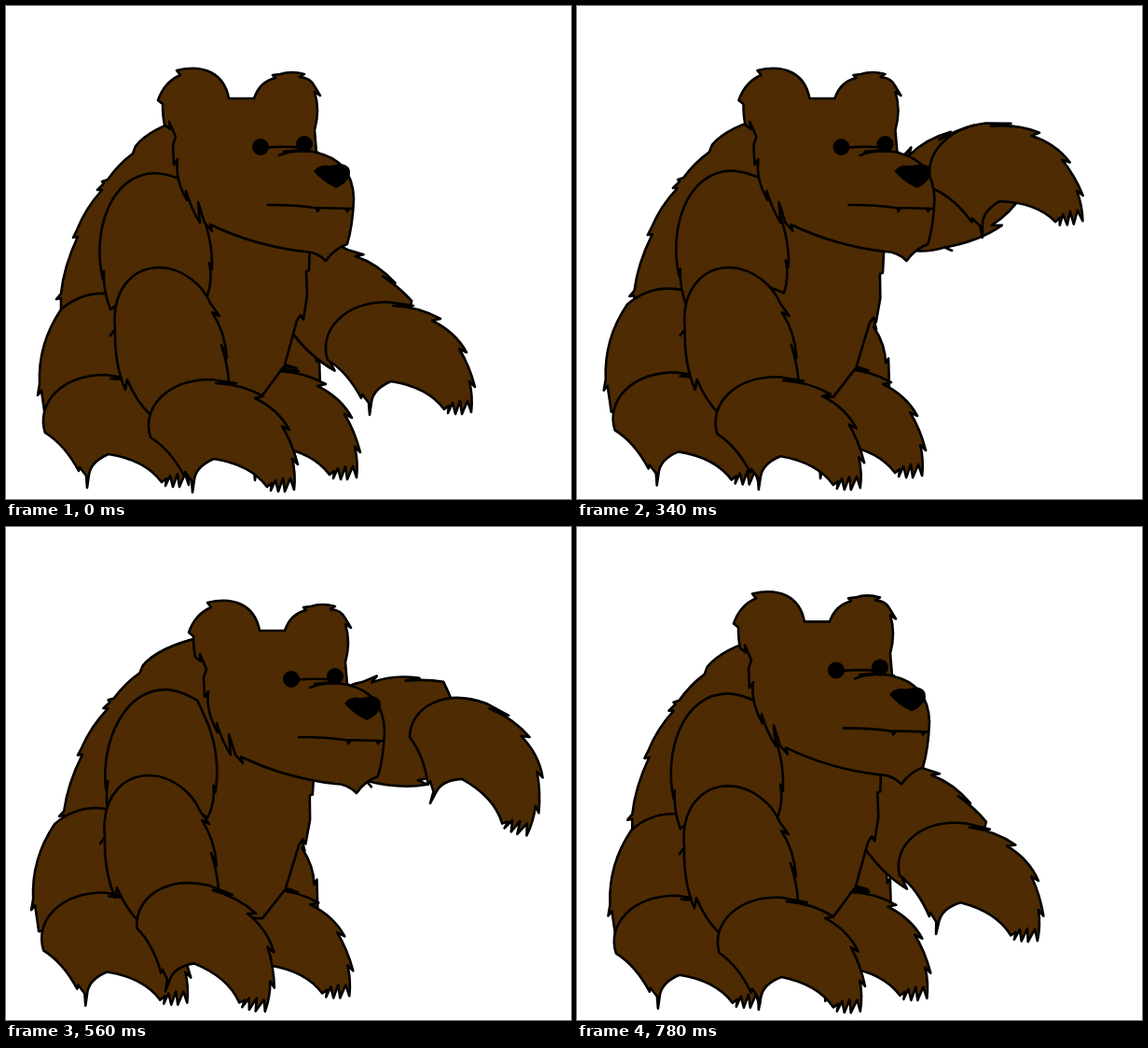
An HTML page with a canvas that plays this animation: 606x528 px, repeating every 800 ms.

```html
<!DOCTYPE html>
<html lang="en">
<head>
<meta charset="utf-8">
<title>Bear swipe</title>
<style>
  html, body { margin: 0; height: 100%; overflow: hidden; background: #fff; }
  canvas { display: block; }
</style>
</head>
<body>
<canvas id="stage" width="606" height="528"></canvas>
<script>
const ctx = document.getElementById('stage').getContext('2d');
const LOOP = 800, STEP = 20, FUR = '#4e2b02';

const paw = `M345 379 C335 348 362 317 410 317 L437 321 L415 321
  Q443 322 466 335 L457 337 Q482 349 494 371 L486 367 Q497 385 503 408 L497 402
  Q501 418 499 435 L495 423 L489 437 L487 423 L482 437 L479 425 L474 436 L475 428 L470 432
  Q452 408 413 402 Q394 410 392 424 L390 438 L389 425 L382 416 L381 420 Q366 392 345 379Z`;
const arm = `M117 346 C113 305 135 280 165 280 C192 281 212 301 219 318 L229 332 L221 328
  Q235 349 237 377 L231 363 Q238 385 239 403 Q200 436 155 438
  Q140 424 130 400 L128 411 Q116 383 117 346 L112 353Z`;
const shoulder = `M112 325 Q104 305 105 284 L104 293 C92 245 110 180 160 179
  Q176 180 190 187 L205 212 Q222 245 221 282 L218 275 Q222 293 216 310 Q165 285 112 325Z`;
const thigh = `M140 316 Q92 296 59 325 Q34 362 36 405 L34 417 L38 412 L42 440 L140 430Z`;
const farThigh = `M300 320 L319 329 L323 345 L320 342 Q333 362 333 381 L336 376 L337 410 L285 410Z`;
const body = `M200 118 Q155 130 139 150 L136 158 Q121 169 109 186 L103 188 L105 190 L98 197 L103 197
  Q85 217 76 240 L72 248 L77 247 Q62 279 59 308 L54 314 L59 313 L59 327 L100 420 L275 417
  L298 386 L312 388 L299 384 L312 337 L316 331 L319 336 L323 310 L322 284 L325 283 L326 250Z`;
const head = `M168 105 L163 101 Q170 81 187 74 L183 69 C212 62 234 72 239 99 L266 99
  Q272 81 289 77 L286 74 L294 73 Q306 69 320 73 L315 76 Q327 77 331 86 L337 96 L331 92
  Q337 111 331 133 L333 157 C356 162 372 177 373 206 Q372 235 366 255 Q352 260 343 273
  Q333 263 320 263 Q267 257 219 234 L221 241 L213 232 L206 210 L208 232 Q199 218 193 198
  L194 208 Q181 185 184 164 L180 170 L179 149 L182 140 L175 124 L176 132 L170 127 Q168 118 168 105Z`;
const faceLines = `M273 153 Q290 149 322 152 M293 160 Q310 153 335 157 M298 156 L318 154
  M281 213 Q312 213 330 216 L371 217`;
const faceFills = `M330 177 Q336 169 347 171 L360 169 Q370 171 369 180 Q366 190 354 195 Q339 188 330 177Z
  M331 216 L334 222 L338 217Z M363 217 L366 222 L370 217Z
  M282 151 A9 9 0 1 1 264 151 A9 9 0 1 1 282 151Z M329 148 A9 9 0 1 1 311 148 A9 9 0 1 1 329 148Z`;

// Back to front. Keys: time, pivot x, pivot y, degrees.
const part = (path, pivot, keys) => ({ path: new Path2D(path), pivot, keys: [...keys, [LOOP, ...keys[0].slice(1)]] });
const parts = [
  part(farThigh, [0, 0], [[0, 0, 0, 0], [520, -3, 2, 0]]),
  part(paw, [425, 385], [[0, 302, 455, 0], [520, 293, 452, 0]]),
  part(arm, [180, 324], [[0, 340, 290, -38], [520, 371, 154, -135], [600, 387, 257, -19]]),
  part(paw, [425, 385], [[0, 425, 385, 0], [520, 482, 88, -12], [560, 506, 258, 20], [600, 424, 399, 54]]),
  part(body, [200, 420], [[0, 200, 420, 0], [520, 200, 420, 1.9]]),
  part(thigh, [0, 0], [[0, 0, 0, 0], [520, -8, -8, 0]]),
  part(paw, [425, 385], [[0, 122, 463, 0], [520, 120, 459, 0]]),
  part(shoulder, [161, 250], [[0, 161, 250, 0], [520, 170, 246, 0], [600, 168, 244, 14]]),
  part(arm, [180, 324], [[0, 180, 324, 0], [520, 178, 324, 0], [600, 160, 296, 0]]),
  part(paw, [425, 385], [[0, 235, 468, 0], [520, 228, 464, 1], [600, 206, 443, 25]]),
  part(head, [0, 0], [[0, 0, 0, 0], [520, 16, 0, 0], [600, 50, 24, 0]])
];
const lines = new Path2D(faceLines), fills = new Path2D(faceFills);

function pose(keys, t) {
  const i = keys.findIndex(k => k[0] > t), a = keys[i - 1], b = keys[i];
  const f = (t - a[0]) / (b[0] - a[0]);
  return [1, 2, 3].map(n => a[n] + (b[n] - a[n]) * f);
}

function draw(now) {
  const t = Math.floor(now % LOOP / STEP) * STEP;
  ctx.resetTransform();
  ctx.fillStyle = '#fff';
  ctx.fillRect(0, 0, 606, 528);
  ctx.lineWidth = 2.6;
  ctx.lineJoin = ctx.lineCap = 'round';
  for (const { path, pivot, keys } of parts) {
    const [x, y, deg] = pose(keys, t);
    ctx.resetTransform();
    ctx.translate(x, y);
    ctx.rotate(deg * Math.PI / 180);
    ctx.translate(-pivot[0], -pivot[1]);
    ctx.fillStyle = FUR;
    ctx.fill(path);
    ctx.stroke(path);
  }
  // The head is drawn last, so the face shares its transform.
  ctx.stroke(lines);
  ctx.fillStyle = '#000';
  ctx.fill(fills);
  requestAnimationFrame(draw);
}
requestAnimationFrame(draw);
</script>
</body>
</html>
```
